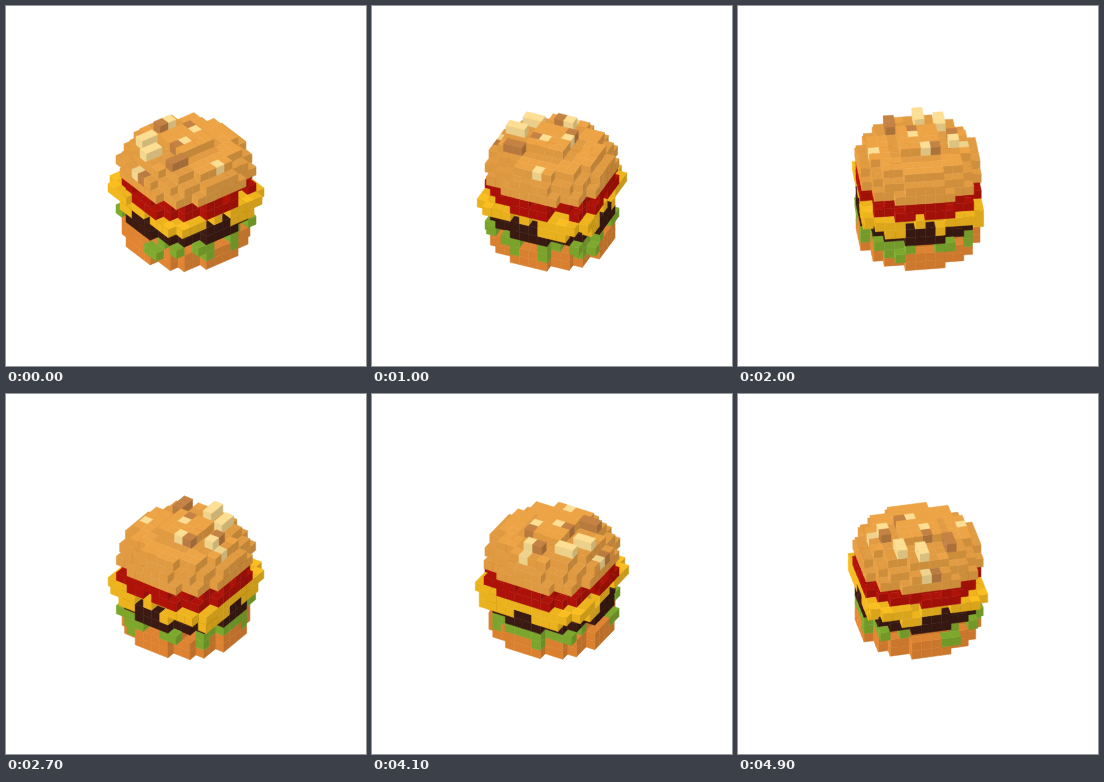
An HTML page with a canvas for the animation above (5 s loop, 360 by 360 pixels).

```html
<!DOCTYPE html>
<html>
<head>
<meta charset="utf-8">
<style>
html, body { margin: 0; height: 100%; overflow: hidden; background: #fff; }
canvas { display: block; }
</style>
</head>
<body>
<canvas id="stage" width="360" height="360"></canvas>
<script>
const ctx = document.getElementById('stage').getContext('2d');
const UNIT = 10, DEPTH = 5.75, RISE = 8.2, CX = 180, CY = 229;
const BUN = [237, 164, 70], BASE = [233, 138, 52], PATTY = [62, 28, 20],
      LETTUCE = [132, 176, 48], CHEESE = [250, 190, 32], TOMATO = [184, 20, 10],
      SEED = [252, 222, 148], TAN = [196, 130, 68];

const cells = new Map();
const key = (x, y, z) => x + ',' + y + ',' + z;
const put = (x, y, z, color) => cells.set(key(x, y, z), { x, y, z, color });
const noise = (x, z, s) => {
  const n = Math.sin(x * 12.9 + z * 78.2 + s * 37.7) * 43758.5;
  return n - Math.floor(n);
};

// One layer: pick(r2, max, min, x, z) tells whether the cell is filled
function layer(y, color, pick) {
  for (let x = -5.5; x < 6; x++)
    for (let z = -5.5; z < 6; z++) {
      const a = Math.abs(x), b = Math.abs(z);
      if (pick(x * x + z * z, Math.max(a, b), Math.min(a, b), x, z)) put(x, y, z, color);
    }
}
const disc = limit => r2 => r2 < limit;

layer(0, BASE, disc(36));
layer(1, BASE, disc(36));
layer(1, LETTUCE, (r2, a, b, x, z) => r2 > 32 && r2 < 41 && noise(x, z, 1) > 0.7);
layer(2, BASE, disc(28));
layer(2, LETTUCE, (r2, a, b, x, z) => r2 > 25 && r2 < 41 && noise(x, z, 2) > 0.45);
layer(3, PATTY, disc(36));
layer(4, PATTY, disc(36));
layer(4, CHEESE, (r2, a, b, x, z) => a > 5 && b > 1 && b < 5 && noise(x, z, 3) > 0.65);
layer(5, CHEESE, (r2, a, b, x, z) => a < 5 || (b < 5 && (b > 2 || noise(x, z, 4) > 0.45)));
layer(6, TOMATO, (r2, a, b, x, z) => r2 < 25 || (r2 < 41 && noise(x, z, 5) > 0.35));
layer(7, TOMATO, (r2, a, b, x, z) => r2 < 28 || (r2 < 36 && noise(x, z, 6) > 0.35));
layer(8, BUN, disc(41));
layer(9, BUN, disc(36));
layer(10, BUN, disc(26));
layer(11, BUN, (r2, a) => a < 2);

// Sesame seeds
[[-3.5, 11, 2.5], [-2.5, 11, 2.5], [-1.5, 11, 0.5], [1.5, 11, -1.5], [-0.5, 11, -3.5],
 [-5.5, 9, 0.5]].forEach(p => put(...p, TAN));
[[0.5, 10, 4.5], [-4.5, 11, -0.5], [-3.5, 11, -0.5], [-0.5, 11, 0.5], [1.5, 11, -0.5],
 [0.5, 11, -3.5], [-5.5, 9, -0.5], [0.5, 10, -4.5], [-3.5, 11, -2.5], [-2.5, 11, -2.5]
].forEach(p => put(...p, SEED));

const has = (x, y, z) => cells.has(key(x, y, z));
const SIDES = [[1, 0], [0, 1], [-1, 0], [0, -1]];
const voxels = [...cells.values()].map(v => ({
  ...v,
  top: !has(v.x, v.y + 1, v.z),
  shade: SIDES.some(([i, k]) => has(v.x + i, v.y + 1, v.z + k)) ? 0.95 : 1,
  open: SIDES.map(([i, k]) => !has(v.x + i, v.y, v.z + k))
})).filter(v => v.top || v.open.includes(true));

function quad(points, color, light) {
  ctx.fillStyle = ctx.strokeStyle = `rgb(${color.map(c => Math.min(255, c * light) | 0)})`;
  ctx.beginPath();
  points.forEach(p => ctx.lineTo(p[0], p[1]));
  ctx.closePath();
  ctx.fill();
  ctx.stroke();
}

function draw(angle) {
  const c = Math.cos(angle), s = Math.sin(angle);
  const project = (x, y, z) =>
    [CX + UNIT * (x * c + z * s), CY + DEPTH * (z * c - x * s) - RISE * y];
  for (const v of voxels) v.near = (v.z * c - v.x * s) * RISE + v.y * DEPTH;
  voxels.sort((a, b) => a.near - b.near);

  ctx.fillStyle = '#fff';
  ctx.fillRect(0, 0, 360, 360);
  ctx.lineWidth = 0.5;
  ctx.lineJoin = 'round';
  for (const { x, y, z, color, top, shade, open } of voxels) {
    SIDES.forEach(([i, k], n) => {
      if (!open[n] || k * c - i * s <= 0) return;
      const mx = x + i / 2, mz = z + k / 2, dx = k / 2, dz = i / 2;
      quad([project(mx - dx, y, mz - dz), project(mx + dx, y, mz + dz),
            project(mx + dx, y + 1, mz + dz), project(mx - dx, y + 1, mz - dz)],
           color, 0.89 - 0.1 * (i * c + k * s));
    });
    if (top) {
      quad([[-1, -1], [1, -1], [1, 1], [-1, 1]].map(([i, k]) => project(x + i / 2, y + 1, z + k / 2)),
           color, shade);
    }
  }
}

function tick(now) {
  const step = Math.floor(now % 5000 / 100);
  draw((37 - 6 * step) * Math.PI / 180);
  requestAnimationFrame(tick);
}
tick(performance.now());
</script>
</body>
</html>
```
